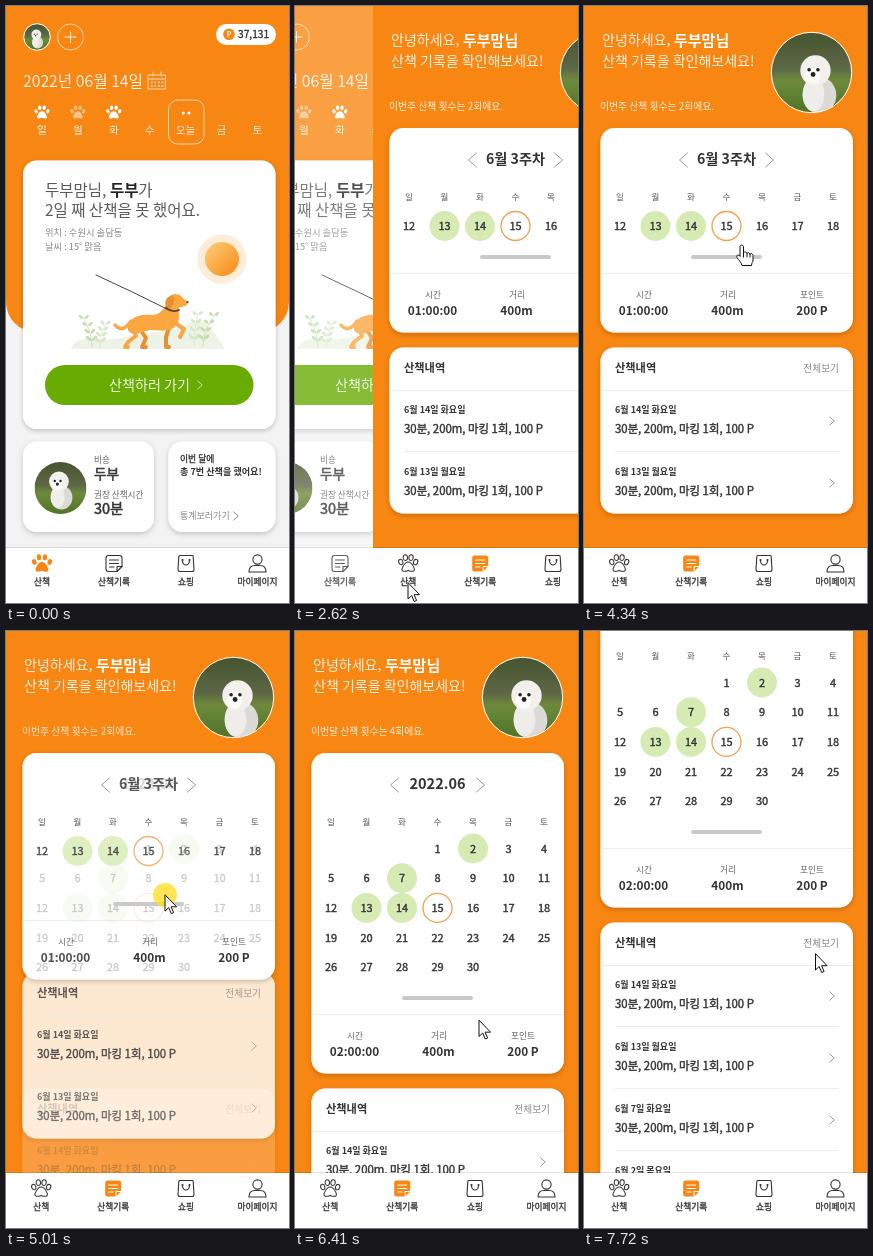
An HTML page with a canvas for the animation above (7.99 s loop, 283x597 px).

```html
<!DOCTYPE html>
<html lang="ko">
<head>
<meta charset="utf-8">
<title>산책 기록</title>
<style>
html, body { margin: 0; width: 100%; height: 100%; overflow: hidden; background: #fff; }
canvas { display: block; width: 100vw; height: 100vh; }
</style>
</head>
<body>
<canvas></canvas>
<script>
const W = 283, H = 597, LOOP = 7990;
const canvas = document.querySelector('canvas');
const c = canvas.getContext('2d');
const ORANGE = '#f88612', INK = '#333', GRAY = '#888', LINE = '#ececec';
const SOFT = 'rgba(255,255,255,.88)', FAINT = 'rgba(255,255,255,.65)';
const FONT = '"Noto Sans CJK KR", "Noto Sans CJK", sans-serif';
const OWNER = '두부맘님', PET = '두부';
const COLS = [36, 71.5, 107, 142.5, 178, 213.5, 249];
const WEEK = [...'일월화수목금토'];

// Timed points: [ms, value, ...]
const CURSOR = [
  [520, 126, 592], [800, 112, 576], [2090, 112, 576], [2500, 113, 577],
  [3360, 113, 577], [3430, 109.5, 569.5], [3700, 140, 480], [3950, 168, 350],
  [4200, 158, 256], [4340, 158, 239], [4540, 158, 242], [5010, 159, 264],
  [5290, 159, 292], [5720, 158, 365], [6000, 157, 410], [6070, 157, 410],
  [6410, 184, 389.5], [7150, 184, 389.5], [7720, 231.5, 323]
];
const SCROLL = [[6610, 0], [6680, 70], [6750, 138], [6820, 166]];
const SLIDE_START = [[1880, 0], [2090, 0.04]];

const clamp = v => Math.max(0, Math.min(1, v));
const within = (t, a, b) => t >= a && t < b;

function track(keys, t, i = 1) {
  const n = keys.findIndex(k => k[0] > t);
  if (n === 0) return keys[0][i];
  if (n < 0) return keys[keys.length - 1][i];
  const a = keys[n - 1], b = keys[n];
  return a[i] + (b[i] - a[i]) * (t - a[0]) / (b[0] - a[0]);
}

function group(draw, { x = 0, y = 0, s = 1, alpha = 1 }) {
  if (alpha <= 0) return;
  c.save();
  c.translate(x, y);
  c.scale(s, s);
  c.globalAlpha *= alpha;
  draw();
  c.restore();
}

// Weight 500 is a regular face thickened by a hairline stroke.
function text(str, x, y, size, color = INK, weight = 400, align = 'left') {
  const medium = weight === 500;
  c.font = `${medium ? 400 : weight} ${size}px ${FONT}`;
  c.textAlign = align;
  c.fillStyle = color;
  c.fillText(str, x, y + size * 0.37);
  if (medium) {
    c.strokeStyle = color;
    c.lineWidth = size * 0.035;
    c.strokeText(str, x, y + size * 0.37);
  }
}
const label = (str, x, y, size, color, weight) => text(str, x, y, size, color, weight, 'center');

function box(x, y, w, h, r, color) {
  c.beginPath();
  c.roundRect(x, y, w, h, r);
  c.fillStyle = color;
  c.fill();
}

// The shadow is kept outside the card so that it stays hidden while fading.
function card(x, y, w, h, r = 14) {
  c.save();
  c.beginPath();
  c.rect(x - 30, y - 30, w + 60, h + 60);
  c.roundRect(x, y, w, h, r);
  c.clip('evenodd');
  c.shadowColor = 'rgba(0,0,0,.2)';
  c.shadowBlur = 5 * canvas.width / W;
  c.shadowOffsetY = 2 * canvas.width / W;
  box(x, y, w, h, r, '#fff');
  c.restore();
  box(x, y, w, h, r, '#fff');
}

function disc(x, y, r, color) {
  c.beginPath();
  c.arc(x, y, r, 0, 7);
  c.fillStyle = color;
  c.fill();
}

function oval(x, y, rx, ry, angle = 0) {
  c.beginPath();
  c.ellipse(x, y, rx, ry, angle, 0, 7);
}

function stroke(d, color, width = 1, cap = 'round') {
  c.strokeStyle = color;
  c.lineWidth = width;
  c.lineCap = cap;
  c.lineJoin = 'round';
  c.stroke(new Path2D(d));
}

function fill(d, color) {
  c.fillStyle = color;
  c.fill(new Path2D(d));
}

function ring(x, y, r, color, width = 1) {
  c.beginPath();
  c.arc(x, y, r, 0, 7);
  c.strokeStyle = color;
  c.lineWidth = width;
  c.stroke();
}

const rule = (x1, x2, y) => stroke(`M${x1} ${y}H${x2}`, LINE, 1, 'butt');
const chevron = (x, y, w, h, color) =>
  stroke(`M${x - w / 2} ${y - h / 2}l${w} ${h / 2}l${-w} ${h / 2}`, color, 1);

function paw(x, y, s, color, outline) {
  group(() => {
    const paint = () => {
      if (outline) { c.strokeStyle = color; c.lineWidth = 1.1; c.stroke(); }
      else { c.fillStyle = color; c.fill(); }
    };
    for (const side of [-1, 1]) {
      oval(side * 7.8, -1, 2.2, 2.9, side * 0.35); paint();
      oval(side * 3, -5.7, 2.3, 3, side * 0.1); paint();
    }
    c.beginPath();
    c.moveTo(0, -1);
    c.bezierCurveTo(4, -1, 5.5, 4, 6.3, 5.5);
    c.bezierCurveTo(7.5, 9, 4, 9.5, 0, 7.8);
    c.bezierCurveTo(-4, 9.5, -7.5, 9, -6.3, 5.5);
    c.bezierCurveTo(-5.5, 4, -4, -1, 0, -1);
    paint();
  }, { x, y, s });
}

function petPhoto(x, y, r, hx, hy) {
  c.save();
  c.beginPath();
  c.arc(x, y, r, 0, 7);
  c.clip();
  const g = c.createLinearGradient(x, y - r, x, y + r);
  g.addColorStop(0, '#46542f');
  g.addColorStop(0.45, '#5d6846');
  g.addColorStop(0.6, '#6d8a3c');
  g.addColorStop(1, '#4f7426');
  c.fillStyle = g;
  c.fillRect(x - r, y - r, 2 * r, 2 * r);
  group(() => {
    oval(0.1, 0.62, 0.42, 0.46); c.fillStyle = '#dcdad5'; c.fill();
    oval(-0.05, 0.6, 0.27, 0.42); c.fillStyle = '#efede9'; c.fill();
    disc(0, 0, 0.38, '#f2f0ed');
    disc(-0.08, 0.14, 0.2, '#fbfaf8');
    disc(-0.16, -0.02, 0.045, '#222');
    disc(0.06, -0.02, 0.045, '#222');
    disc(-0.06, 0.1, 0.06, '#222');
  }, { x: x + hx * r, y: y + hy * r, s: r });
  c.restore();
}

function sprig(x, y, h, lean, color) {
  stroke(`M${x} ${y}q0 ${-h / 2} ${lean} ${-h}`, color, 0.8);
  c.fillStyle = color;
  for (let i = 1; i <= 4; i++) {
    const k = i / 4.2, px = x + lean * k * k, py = y - h * k;
    for (const side of [-1, 1]) {
      oval(px + side * 3, py - 1.5, 3.6 - i * 0.3, 1.5, -side * 0.7);
      c.fill();
    }
  }
}

function walkScene() {
  disc(216, 253, 24.5, '#fdecd8');
  const g = c.createLinearGradient(204, 241, 228, 266);
  g.addColorStop(0, '#fdc46c');
  g.addColorStop(1, '#f8921f');
  disc(216, 253, 17, g);

  fill('M65 343C67 335 78 331 88 333C104 336 118 330 132 329C152 327 165 324 178 320C186 315 194 312 200 318C207 324 214 334 219 343Z', '#edf3e6');
  sprig(86, 341, 30, -9, '#c5deb0');
  sprig(94, 341, 24, 6, '#d6e8c8');
  sprig(188, 340, 33, 4, '#d6e8c8');
  sprig(197, 340, 32, 12, '#c5deb0');

  const dark = '#e98f2d', coat = '#faa741';
  stroke('M125 315C120 323 114 325 109 319', coat, 3.5);
  stroke('M134 323L140 332L136 341H140', dark, 4);
  stroke('M164 319L160 331V341H163', dark, 4);
  fill('M122 320C125 309 138 308 146 309C153 309 157 304 160 299C161 292 164 288 169 288C174 288 176 291 178 293L182 296C182 300 177 301 173 301C172 306 175 314 170 320C163 327 152 324 146 324C140 324 134 328 128 328C123 327 121 324 122 320Z', coat);
  stroke('M127 322L130 330L122 336L119 341H122', coat, 4);
  stroke('M169 317L178 323L174 331', coat, 4);
  fill('M165 290C159 291 158 298 161 303C166 303 169 297 168 291Z', dark);
  stroke('M160 302Q166 307 173 304', '#5a4634', 1.8);
  disc(181.5, 296, 1.1, '#4a3526');
  stroke('M90 269Q125 285 161 303', '#444', 1);
}

function noteIcon(x, y, active) {
  group(() => {
    const sheet = 'M-5.5-8H5.5Q8-8 8-5.5V3L3 8H-5.5Q-8 8-8 5.5V-5.5Q-8-8-5.5-8Z';
    if (active) fill(sheet, ORANGE); else stroke(sheet, INK, 1.1);
    const ink = active ? '#fff' : INK;
    stroke('M-4.5-3.5H4.5M-4.5 0H4.5M-4.5 3.5H0M8 3H3V8', ink, 1.1);
  }, { x, y });
}

function tabBar(active, shift) {
  c.fillStyle = 'rgba(0,0,0,.12)';
  c.fillRect(0, 541, W, 1);
  c.fillStyle = '#fff';
  c.fillRect(0, 542, W, 55);
  const home = active === 0;
  paw(36 + shift, 557, home ? 1 : 0.95, home ? ORANGE : INK, !home);
  noteIcon(108 + shift, 557.5, !home);
  group(() => {
    stroke('M-6-8H6Q7-8 7.2-7L8 6Q8 8 6 8H-6Q-8 8-8 6L-7.2-7Q-7-8-6-8Z', INK, 1.1);
    stroke('M-3.5-2.5Q-3 1.5 0 1.5T3.5-2.5', INK, 1.1);
    disc(-3.5, -3.5, 1.1, INK);
    disc(3.5, -3.5, 1.1, INK);
  }, { x: 180, y: 557.5 });
  ring(251.5, 553.5, 4.6, INK, 1.1);
  stroke('M243 566Q243 559.5 249 559.5H254Q260 559.5 260 566Z', INK, 1.1);
  label('산책', 36 + shift, 576, 8.7, INK, 500);
  label('산책기록', 108 + shift, 576, 8.7, INK, 500);
  label('쇼핑', 180, 576, 8.7, INK, 500);
  label('마이페이지', 251.5, 576, 8.7, INK, 500);
}

function homePage() {
  c.fillStyle = '#f3f3f3';
  c.fillRect(0, 0, W, H);
  box(0, -40, W, 366, 30, ORANGE);

  petPhoto(31, 31, 13, -0.05, -0.2);
  ring(31, 31, 13.3, '#fff');
  ring(64.5, 31, 13, FAINT);
  stroke('M59 31H70M64.5 25.5V36.5', SOFT, 1);
  box(210, 18, 60, 21, 10.5, '#fff');
  disc(223, 28.3, 5.8, ORANGE);
  label('P', 223, 28.3, 7, '#fff', 700);
  text('37,131', 232, 28.3, 10.2, INK, 500);

  text('2022년 06월 14일', 17, 75, 15.7, SOFT, 300);
  stroke('M142.5 69H159.5V83H142.5ZM142.5 73H159.5M147 66V70M155 66V70', FAINT, 1);
  c.fillStyle = FAINT;
  for (let i = 0; i < 8; i++) c.fillRect(145 + i % 4 * 3.5, 75.5 + (i >> 2) * 3.5, 1.8, 1.8);
  WEEK.forEach((d, i) => {
    const x = 36 + i * 35.9;
    label(i === 4 ? '오늘' : d, x, 124, 10.7, SOFT, 300);
    if (i < 3) paw(x, 106, 0.75, i === 1 ? '#fcc48b' : '#fff');
  });
  c.beginPath();
  c.roundRect(162.5, 94, 35.5, 44, 9);
  c.strokeStyle = FAINT;
  c.lineWidth = 1;
  c.stroke();
  disc(177.3, 107, 1.6, '#fff');
  disc(183, 107, 1.6, '#fff');

  card(17, 154.5, 252.5, 268.5);
  text(OWNER + ',', 39, 184, 15.5, '#5a5a5a');
  text(PET, 104, 184, 15.5, '#222', 700);
  text('가', 132.3, 184, 15.5, '#5a5a5a');
  text('2일 째 산책을 못 했어요.', 39, 204, 15.5, '#5a5a5a');
  text('위치 : 수원시 솔담동', 39, 227, 9.3, GRAY);
  text('날씨 : 15˚ 맑음', 39, 241, 9.3, GRAY);
  walkScene();
  box(39, 359, 208.5, 40, 20, '#68ab02');
  text('산책하러 가기', 103, 379, 14.1, SOFT);
  chevron(194, 379, 4.5, 8, FAINT);

  card(17, 435.5, 131, 90.5);
  petPhoto(54.5, 482, 26, -0.06, -0.25);
  text('비숑', 88, 454, 8.6, '#666');
  text(PET, 88, 468, 13.7, INK, 500);
  text('권장 산책시간', 88, 489, 8.6, '#666');
  text('30분', 88, 503, 14.5, INK, 500);

  card(162.5, 435.5, 107, 90.5);
  text('이번 달에', 174, 453, 8.8, INK, 500);
  text('총 7번 산책을 했어요!', 174, 466, 9.1, INK, 700);
  text('통계보러가기', 174, 510, 9, GRAY);
  chevron(230, 510, 4.5, 8, GRAY);
  tabBar(0, 0);
}

function day(d, y) {
  const x = COLS[(d + 2) % 7];
  if ([2, 7, 13, 14].includes(d)) disc(x, y, 15, '#d6ebb4');
  if (d === 15) ring(x, y, 14.5, '#f3a04d', 1.3);
  label(d, x, y, 11, INK, 500);
}

function weekView() {
  label('6월 3주차', 142.5, 153, 14.2, INK, 700);
  for (let d = 12; d <= 18; d++) day(d, 220);
}

function monthView() {
  label('2022.06', 142.5, 153, 14.5, INK, 700);
  for (let d = 1; d <= 30; d++) day(d, 217.5 + Math.floor((d + 2) / 7) * 29.7);
}

function calendar(p) {
  const dy = 116 * p;
  card(16.5, 122, 252.5, 204.5 + dy);
  chevron(99.5, 154, -8, 14, '#999');
  chevron(185.5, 154, 8, 14, '#999');
  WEEK.forEach((d, i) => label(d, COLS[i], 191, 8.5, '#555'));
  group(weekView, { alpha: 1 - p });
  group(monthView, { alpha: p });
  group(() => {
    box(107, 249, 71, 4, 2, '#c9c9c9');
    rule(16.5, 269, 267.5);
    [['시간', 60], ['거리', 144], ['포인트', 228]].forEach(([s, x]) => label(s, x, 289, 8.7, '#666'));
    group(() => label('01:00:00', 59.5, 304.5, 11.8, INK, 700), { alpha: 1 - p });
    group(() => label('02:00:00', 59.5, 304.5, 11.8, INK, 700), { alpha: p });
    label('400m', 143.5, 304.5, 11.8, INK, 700);
    label('200 P', 228, 304.5, 11.8, INK, 700);
  }, { y: dy });
}

function walkList(dates) {
  card(16.5, 341.5, 252.5, 42 + dates.length * 62);
  text('산책내역', 31, 362, 11.2, INK, 700);
  text('전체보기', 255, 362, 9.7, GRAY, 400, 'right');
  rule(16.5, 269, 384.5);
  dates.forEach((date, i) => {
    const y = i * 62;
    if (i) rule(31, 255, 383.5 + y);
    text(date, 31, 404 + y, 9, INK, 700);
    text('30분, 200m, 마킹 1회, 100 P', 31, 422.5 + y, 11.4, INK, 500);
    chevron(248, 415 + y, 4.5, 8, '#999');
  });
}

const RECENT = ['6월 14일 화요일', '6월 13일 월요일'];
const MONTH = [...RECENT, '6월 7일 화요일', '6월 2일 목요일'];

function recordPage(p, scroll) {
  c.fillStyle = ORANGE;
  c.fillRect(0, 0, W, H);
  group(() => {
    text('안녕하세요,', 18, 34, 14, SOFT, 300);
    text(OWNER, 90, 34, 15, '#fff', 700);
    text('산책 기록을 확인해보세요!', 18, 55, 14, SOFT, 300);
    group(() => text('이번주 산책 횟수는 2회에요.', 16, 100, 9.8, SOFT, 300), { alpha: 1 - p });
    group(() => text('이번달 산책 횟수는 4회에요.', 16, 100, 9.8, SOFT, 300), { alpha: p });
    petPhoto(227.5, 66.5, 40, 0.1, -0.05);
    ring(227.5, 66.5, 40.2, '#fff', 1);
    group(() => walkList(RECENT), { alpha: 1 - p });
    group(() => walkList(MONTH), { y: 116, alpha: p });
    calendar(p);
  }, { y: -scroll });
  tabBar(1, -0.8);
}

function slideAt(t) {
  const k = clamp((t - 2431) / 400);
  return Math.max(track(SLIDE_START, t), 1 - (1 - k) ** 2);
}

function pointer(t, x, y) {
  if (t < 530) return;
  if (within(t, 1810, 1950) || within(t, 4540, 6000)) disc(x, y, 12, 'rgba(255,222,40,.8)');
  group(() => {
    if (within(t, 600, 2100) || within(t, 4130, 4540)) {
      const hand = 'M-2 11V2C-2-.5 1.5-.5 1.5 2V8C1.5 6.5 5 6.5 5 8.5C5.5 7 8 7.5 8 9.3C8.5 8 11 8.5 11 10.5V15C11 17 9.5 18 9.5 20.5H0C-.5 17.5-3 15.5-5 12.5C-6 10.5-4.5 9-2 11Z';
      fill(hand, '#fff');
      stroke(hand + 'M1.5 8V12M5 8.5V12M8 9.5V12', '#111', 1);
    } else {
      const arrow = 'M0 0V16L3.7 12.5L6.2 18.5L8.6 17.5L6.1 11.7H11.2Z';
      fill(arrow, '#fff');
      stroke(arrow, '#111', 1);
    }
  }, { x, y });
}

function render(t) {
  const slide = slideAt(t);
  const x = track(CURSOR, t, 1), y = track(CURSOR, t, 2);
  if (slide < 1) {
    group(homePage, { x: Math.round(-87 * slide) });
    c.fillStyle = `rgba(255,255,255,${0.28 * slide})`;
    c.fillRect(0, 0, W, H);
  }
  if (slide > 0) {
    const drag = t < 4540 ? 0 : t > 6000 ? 1 : clamp((y - 242) / 116);
    group(() => recordPage(drag, track(SCROLL, t)), { x: Math.round(W * (1 - slide)) });
  }
  pointer(t, x, y);
}

function fit() {
  const d = window.devicePixelRatio || 1;
  const w = Math.round(innerWidth * d), h = Math.round(innerHeight * d);
  if (canvas.width !== w || canvas.height !== h) {
    canvas.width = w;
    canvas.height = h;
  }
  c.setTransform(w / W, 0, 0, h / H, 0, 0);
}

const start = performance.now();
function tick() {
  fit();
  render((performance.now() - start) % LOOP);
  requestAnimationFrame(tick);
}
tick();
</script>
</body>
</html>
```
